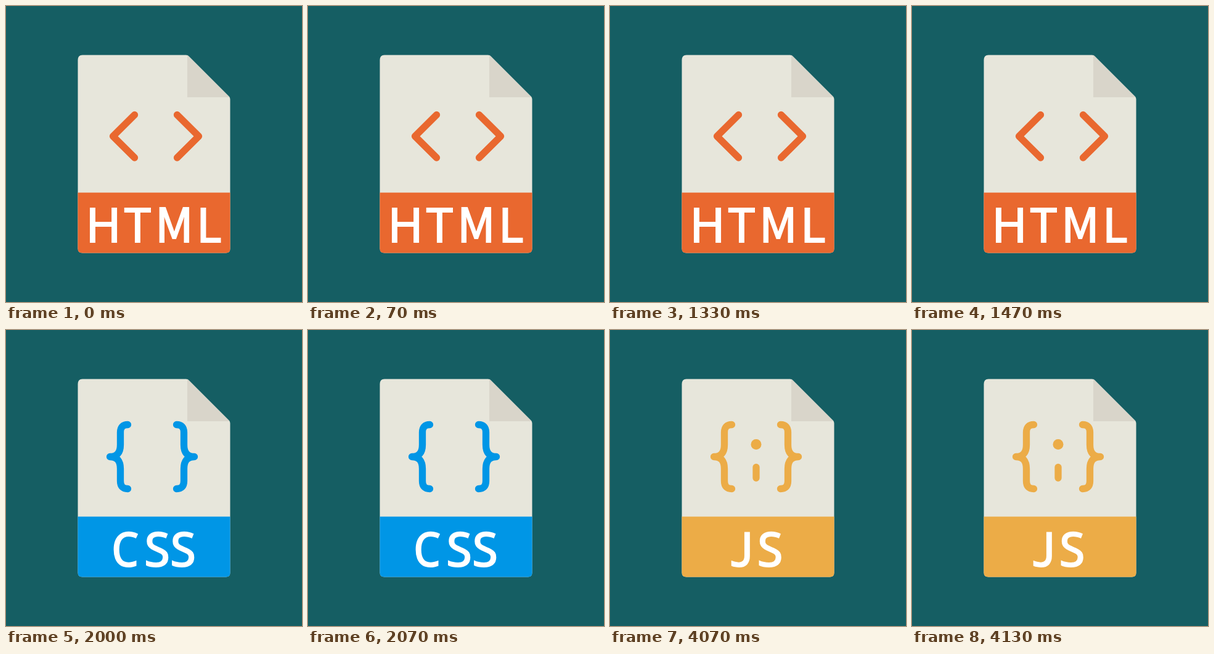
Write an HTML page with a canvas that moves like this. It is 480x480 px and loops after 5990 ms.

```html
<!DOCTYPE html>
<html lang="en">
<head>
<meta charset="utf-8">
<title>File types</title>
<style>
  html, body { margin: 0; width: 100%; height: 100%; overflow: hidden; background: #155e63; }
  canvas { display: block; width: 480px; height: 480px; }
</style>
</head>
<body>
<canvas width="480" height="480"></canvas>
<script>
const ctx = document.querySelector('canvas').getContext('2d');
const LOOP = 5990;
const AXIS = 237;
const BASELINE = 382.5;
const CAP_HEIGHT = 55.5;
const SANS = '"Noto Sans", "Open Sans", sans-serif';
const CJK = '"Noto Sans CJK JP", "Noto Sans CJK SC", "Noto Sans CJK", sans-serif';
const MONO = '"Noto Sans Mono", monospace';

const chevron = new Path2D('M208.5 176.5 L173.5 211.2 L208.5 246');
const brace = new Path2D(
  'M197.5 153.5 Q185.5 153.5 185.5 166 V186 Q185.5 205.5 168.5 205.5' +
  'Q185.5 205.5 185.5 225 V245 Q185.5 257.5 197.5 257.5');
const page = new Path2D(
  'M124 79.5 H292 Q294.5 79.5 296 81 L362 147 Q363.5 148.5 363.5 151.5' +
  'V393.5 Q363.5 400.5 356.5 400.5 H124 Q116.5 400.5 116.5 393.5 V87.5 Q116.5 79.5 124 79.5 Z');
const fold = new Path2D('M294 79.5 L362.5 148 H294 Z');

// Each letter is [character, centre of its ink, font family].
const cards = [
  { from: 0, color: '#e9682f', symbol: chevron, axis: 243,
    label: [['H', 158, SANS], ['T', 213, SANS], ['M', 273, CJK], ['L', 332, SANS]] },
  { from: 2000, color: '#0096e6', symbol: brace, axis: AXIS,
    label: [['C', 194.5, MONO], ['S', 245, MONO], ['S', 287, MONO]] },
  { from: 4000, color: '#ecac47', symbol: brace, axis: AXIS, semicolon: true,
    label: [['J', 211.5, MONO], ['S', 259.5, MONO]] }
];

function drawPair(path, axis) {
  ctx.stroke(path);
  ctx.save();
  ctx.translate(2 * axis, 0);
  ctx.scale(-1, 1);
  ctx.stroke(path);
  ctx.restore();
}

function drawSemicolon(color) {
  ctx.fillStyle = color;
  ctx.beginPath();
  ctx.arc(AXIS, 185.5, 8.5, 0, Math.PI * 2);
  ctx.fill();
  ctx.beginPath();
  ctx.moveTo(AXIS, 222.5);
  ctx.lineTo(AXIS, 240);
  ctx.stroke();
}

// Sizes the font so that its capitals have the shared height.
function setFont(family) {
  ctx.font = `400 100px ${family}`;
  const cap = ctx.measureText('H').actualBoundingBoxAscent;
  ctx.font = `400 ${100 * CAP_HEIGHT / cap}px ${family}`;
}

function drawLetter([char, center, family]) {
  setFont(family);
  const ink = ctx.measureText(char);
  const x = center - (ink.actualBoundingBoxRight - ink.actualBoundingBoxLeft) / 2;
  ctx.fillText(char, x, BASELINE);
  ctx.strokeText(char, x, BASELINE);
}

function draw(card) {
  ctx.fillStyle = '#155e63';
  ctx.fillRect(0, 0, 480, 480);

  ctx.fillStyle = '#e7e6db';
  ctx.fill(page);
  ctx.fillStyle = '#d9d5ca';
  ctx.fill(fold);

  ctx.save();
  ctx.clip(page);
  ctx.fillStyle = card.color;
  ctx.fillRect(116, 302.6, 248, 99);
  ctx.restore();

  ctx.strokeStyle = card.color;
  ctx.lineWidth = 11.3;
  ctx.lineCap = ctx.lineJoin = 'round';
  drawPair(card.symbol, card.axis);
  if (card.semicolon) drawSemicolon(card.color);

  ctx.fillStyle = ctx.strokeStyle = '#fff';
  ctx.lineWidth = 2;
  ctx.lineJoin = 'miter';
  ctx.miterLimit = 3;
  card.label.forEach(drawLetter);
}

const start = performance.now();
function tick() {
  const time = (performance.now() - start) % LOOP;
  draw(cards.findLast(card => time >= card.from));
  requestAnimationFrame(tick);
}
tick();
</script>
</body>
</html>
```
